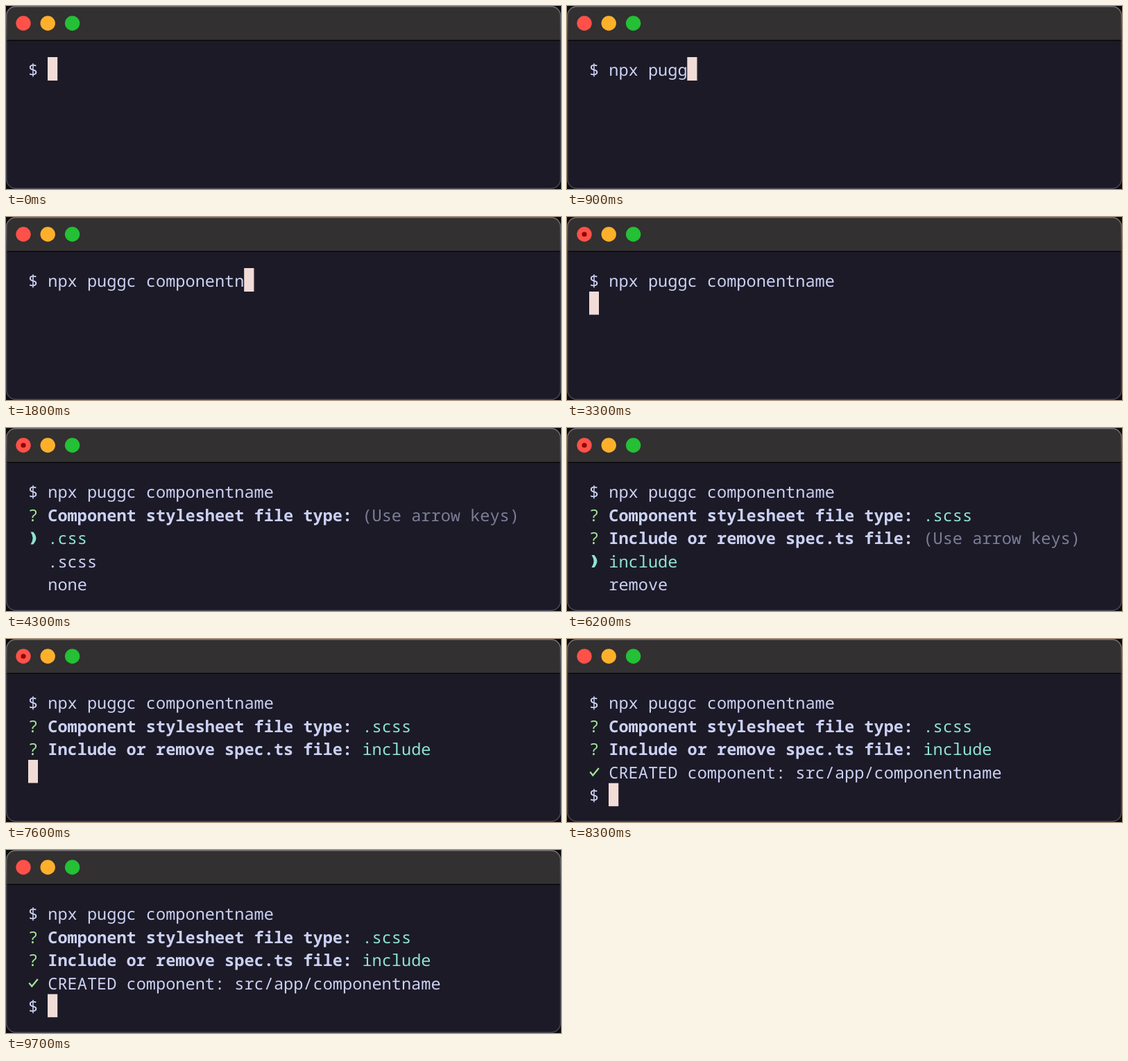
An HTML page for the animation above (9.8 s loop, 800 by 265 pixels).

```html
<!DOCTYPE html>
<html lang="en">
<head>
<meta charset="utf-8">
<title>Component generator in a terminal</title>
<style>
  html, body { margin: 0; width: 100%; height: 100%; overflow: hidden; background: #0c0c0e; }
  svg { display: block; width: 800px; height: 265px; --w: 14.16px; }

  text {
    font: 23.6px "Noto Sans Mono", "DejaVu Sans Mono", monospace;
    fill: #cbd1f3;
    white-space: pre;
    text-rendering: geometricPrecision;
  }
  .bold { font-weight: 700; }
  .green { fill: #a2e594; }
  .teal { fill: #8ee3cf; }
  .dim { fill: #7c7e98; }
  .cursor { fill: #f2dcd8; }
  .check { fill: none; stroke: #a2e594; stroke-width: 2.3; }

  .type, .run, .wait, .ask1, .first, .second, .done1, .ask2, .done2, .busy, .end {
    animation: 9.8s step-end infinite;
  }
  .type { animation-name: type; }
  .run { animation-name: run; }
  .wait { animation-name: wait; }
  .ask1 { animation-name: ask1; }
  .first { animation-name: first; }
  .second { animation-name: second; }
  .done1 { animation-name: done1; }
  .ask2 { animation-name: ask2; }
  .done2 { animation-name: done2; }
  .busy { animation-name: busy; }
  .end { animation-name: end; }

  /* typing speed changes between the stretches of the command */
  @keyframes type {
    0% { transform: none; }
    2% { transform: translateX(0); animation-timing-function: steps(8); }
    9.1% { transform: translateX(calc(var(--w) * 8)); animation-timing-function: steps(12); }
    18.3% { transform: translateX(calc(var(--w) * 20)); animation-timing-function: steps(3); }
    21.4% { transform: translateX(calc(var(--w) * 23)); visibility: visible; }
    24.4%, 100% { transform: translateX(calc(var(--w) * 23)); visibility: hidden; }
  }
  @keyframes run { 0% { visibility: hidden; } 24.4% { visibility: visible; } 81.6%, 100% { visibility: hidden; } }
  @keyframes wait { 0% { visibility: hidden; } 24.4% { visibility: visible; } 43.8%, 100% { visibility: hidden; } }
  @keyframes ask1 { 0% { visibility: hidden; } 43.8% { visibility: visible; } 58.1%, 100% { visibility: hidden; } }
  @keyframes first { 0% { visibility: hidden; } 43.8% { visibility: visible; } 49.9%, 100% { visibility: hidden; } }
  @keyframes second { 0% { visibility: hidden; } 49.9% { visibility: visible; } 58.1%, 100% { visibility: hidden; } }
  @keyframes done1 { 0% { visibility: hidden; } 58.1%, 100% { visibility: visible; } }
  @keyframes ask2 { 0% { visibility: hidden; } 58.1% { visibility: visible; } 68.3%, 100% { visibility: hidden; } }
  @keyframes done2 { 0% { visibility: hidden; } 68.3%, 100% { visibility: visible; } }
  @keyframes busy { 0% { visibility: hidden; } 68.3% { visibility: visible; } 81.6%, 100% { visibility: hidden; } }
  @keyframes end { 0% { visibility: hidden; } 81.6%, 100% { visibility: visible; } }
</style>
</head>
<body>
<svg viewBox="0 0 800 265">
  <defs>
    <clipPath id="frame"><rect width="800" height="265" rx="14"/></clipPath>
    <linearGradient id="edge" x2="0" y2="1">
      <stop offset="0" stop-color="#747274"/>
      <stop offset=".2" stop-color="#4c4a54"/>
      <stop offset="1" stop-color="#4c4a56"/>
    </linearGradient>
    <path id="pointer" d="M35.5 184H39.3Q43.4 189 43.4 193T39.3 202H35.5Q38.6 197 38.6 193T35.5 184Z"/>
    <g id="question1">
      <text x="32" y="134.5"><tspan class="green">?</tspan> <tspan class="bold">Component stylesheet file type:</tspan></text>
    </g>
    <g id="question2">
      <text x="32" y="168"><tspan class="green">?</tspan> <tspan class="bold">Include or remove spec.ts file:</tspan></text>
    </g>
  </defs>

  <g clip-path="url(#frame)">
    <rect width="800" height="265" fill="#1c1a27"/>
    <rect width="800" height="49" fill="#323031"/>
    <rect y="49" width="800" height="1.5" fill="#09090c"/>

    <text x="32" y="101">$ npx puggc componentname</text>
    <g class="type">
      <rect x="60.3" y="70" width="420" height="42" fill="#1c1a27"/>
      <rect class="cursor" x="60" y="74" width="14.2" height="34"/>
    </g>
    <rect class="cursor wait" x="32" y="108" width="14" height="33.5"/>

    <g class="ask1">
      <use href="#question1"/>
      <text x="60.3" y="235">none</text>
    </g>
    <g class="first">
      <text class="dim" x="513.4" y="134.5">(Use arrow keys)</text>
      <use class="teal" href="#pointer" y="-33.5"/>
      <text class="teal" x="60.3" y="168">.css</text>
      <text x="60.3" y="201.5">.scss</text>
    </g>
    <g class="second">
      <text x="60.3" y="168">.css</text>
      <use class="teal" href="#pointer"/>
      <text class="teal" x="60.3" y="201.5">.scss</text>
    </g>

    <g class="done1">
      <use href="#question1"/>
      <text class="teal" x="513.4" y="134.5">.scss</text>
      <use href="#question2"/>
    </g>
    <g class="ask2">
      <text class="dim" x="513.4" y="168">(Use arrow keys)</text>
      <use class="teal" href="#pointer"/>
      <text class="teal" x="60.3" y="201.5">include</text>
      <text x="60.3" y="235">remove</text>
    </g>
    <text class="teal done2" x="513.4" y="168">include</text>
    <rect class="cursor busy" x="32" y="175" width="14" height="33.5"/>

    <g class="end">
      <path class="check" d="M33.3 192.5L37.3 197.5L45.8 187"/>
      <text x="60.3" y="201.5">CREATED component: src/app/componentname</text>
      <text x="32" y="235">$</text>
      <rect class="cursor" x="60" y="208.7" width="14.2" height="33.5"/>
    </g>
  </g>

  <circle cx="25" cy="25" r="10.7" fill="#ff5149"/>
  <circle cx="60.2" cy="25" r="10.7" fill="#ffb02b"/>
  <circle cx="95.6" cy="25" r="10.7" fill="#24c035"/>
  <circle class="run" cx="25" cy="25" r="3.6" fill="#8b0906"/>
  <rect x=".75" y=".75" width="798.5" height="263.5" rx="13.5" fill="none" stroke="url(#edge)" stroke-width="1.3"/>
</svg>
</body>
</html>
```
